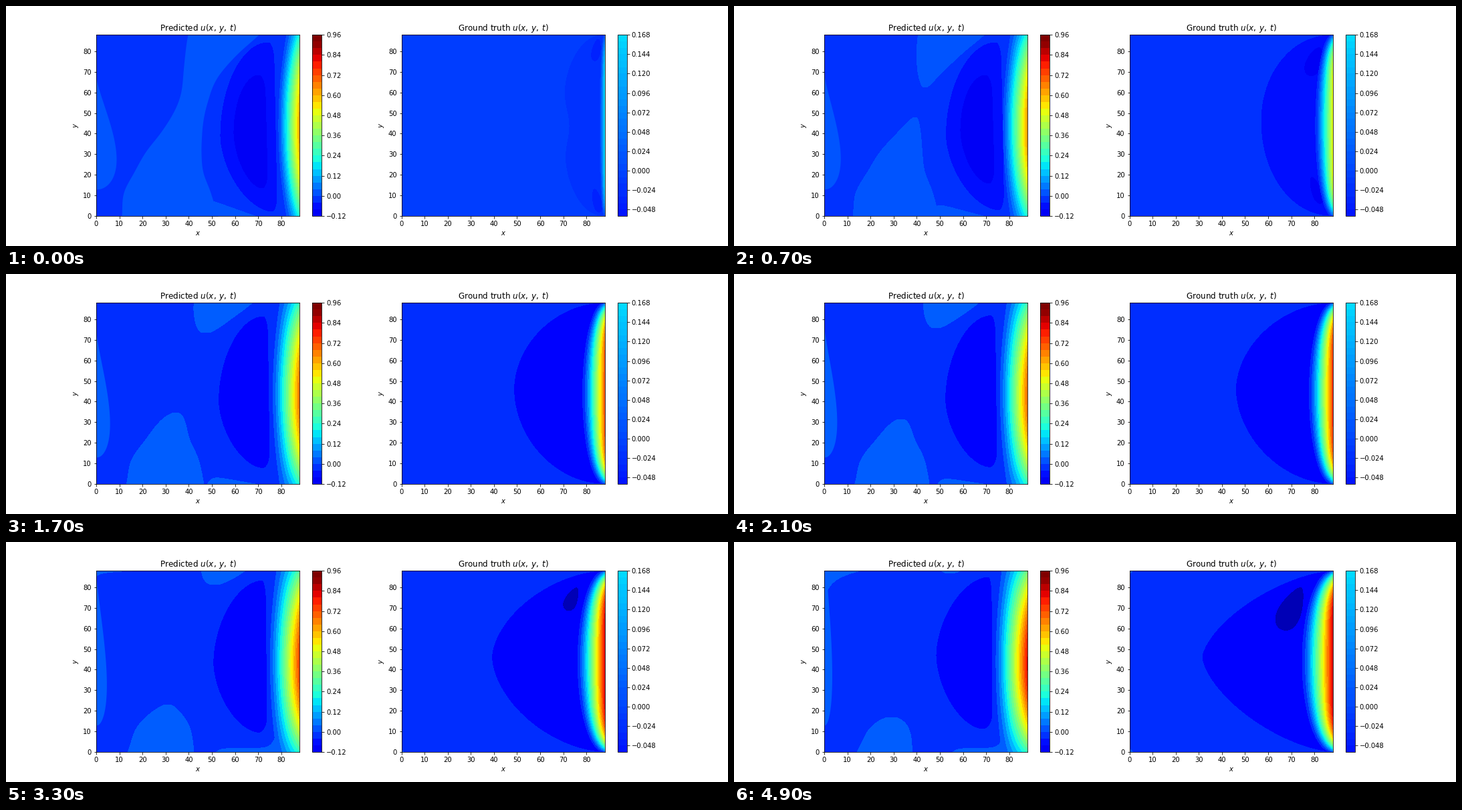
Animation of 1080x360 px, one loop 5000 ms. Source, as a matplotlib script:

```python
import numpy as np
import matplotlib.pyplot as plt
from matplotlib.animation import FuncAnimation

FRAMES = 50
VMIN, VMAX = -0.22, 0.92
TOP, BOTTOM, MIDDLE = 43.2, 315.0, 179.1
HALF = (BOTTOM - TOP) / 2
NICE_STEPS = np.array([0.01, 0.015, 0.02, 0.025, 0.03, 0.04, 0.05])

# Rows, centre line and first half width of the pale strip, in stage pixels.
STRIP_Y = [43, 70, 100, 145, 190, 220, 250, 280, 315]
STRIP_MID = [325, 308, 293, 279, 262, 250, 243, 241, 245]
STRIP_HALF = [53, 40, 28, 22, 31, 42, 52, 65, 72]

plt.rcParams.update({"font.family": "DejaVu Sans", "font.size": 10,
                     "figure.subplot.bottom": 0.125})
fig, (pred, truth) = plt.subplots(1, 2, figsize=(15, 5), dpi=72)
LEFT = {pred: 135.0, truth: 591.5}
jet = plt.get_cmap("jet")
norm = plt.Normalize(VMIN, VMAX)
drawn = []


def setup(ax, title, levels, ticks):
    ax.set(xlim=(0, 88), ylim=(0, 88), xlabel="$x$", ylabel="$y$")
    ax.set_title(title + r" $u(x,\:y,\:t)$")
    ax.set_xticks(range(0, 90, 10))
    ax.set_yticks(range(0, 90, 10))
    sm = plt.cm.ScalarMappable(norm, jet)
    bar = fig.colorbar(sm, ax=ax, boundaries=levels, ticks=ticks)
    bar.minorticks_off()


setup(pred, "Predicted", np.linspace(-0.12, 0.96, 28), np.arange(-1, 9) * 0.12)
setup(truth, "Ground truth", np.linspace(-0.056, 0.168, 29), np.arange(-2, 8) * 0.024)


def shade(u):
    return jet(norm(u))


def level_step(peak):
    """Smallest round step that needs at most 18 levels."""
    i = np.searchsorted(NICE_STEPS, (peak + 0.06) / 18)
    return NICE_STEPS[min(i, len(NICE_STEPS) - 1)]


def curve(x, xp, fp):
    """Smooth cubic through the given points."""
    xp, fp = np.asarray(xp, float), np.asarray(fp, float)
    m = np.gradient(fp, xp)
    i = np.clip(np.searchsorted(xp, x) - 1, 0, len(xp) - 2)
    h = xp[i + 1] - xp[i]
    u = (x - xp[i]) / h
    return ((2 * u**3 - 3 * u**2 + 1) * fp[i] + (u**3 - 2 * u**2 + u) * h * m[i]
            + (3 * u**2 - 2 * u**3) * fp[i + 1] + (u**3 - u**2) * h * m[i + 1])


def to_data(ax, x, y):
    return ((np.asarray(x) - LEFT[ax]) * 88 / 304.4,
            (BOTTOM - np.asarray(y)) * 88 / (BOTTOM - TOP))


def fill(ax, x, y, color):
    drawn.extend(ax.fill(*to_data(ax, x, y), color=color, lw=0, antialiased=False))


def between_x(ax, y, x1, x2, color, where=None):
    left, yd = to_data(ax, x1, y)
    right, _ = to_data(ax, x2, y)
    drawn.append(ax.fill_betweenx(yd, left, right, where=where, color=color,
                                  lw=0, antialiased=False))


def bands(ax, x, y, start, edge, base, power, step):
    """Boundary layer that climbs from base at start to edge at the right side."""
    s = (x - start) / (LEFT[ax] + 304.4 - start)
    u = base + (edge - base) * np.sign(s) * abs(s) ** power
    levels = base + step * np.arange(np.ceil(1.1 / step))
    drawn.append(ax.contourf(*to_data(ax, x, y), u, levels=levels, cmap=jet,
                             vmin=VMIN, vmax=VMAX))


def arc(p, q, n):
    """Quarter superellipse leaving p vertically and reaching q flat."""
    a = np.linspace(0, np.pi / 2, 40)
    c, s = np.cos(a).clip(0) ** (2 / n), np.sin(a) ** (2 / n)
    return np.c_[q[0] + (p[0] - q[0]) * c, p[1] + (q[1] - p[1]) * s]


def pocket(ax, left, top, upper, lower, bottom, n, color):
    ring = np.vstack([arc(left, top, n), arc(upper, top, 2)[::-1],
                      arc(lower, bottom, 2), arc(left, bottom, 1.7)[::-1]])
    fill(ax, *ring.T, color)


def drop(ax, top, bottom, width, skew, color):
    """Teardrop between two tips, fuller near the bottom one."""
    a = np.linspace(0, 2 * np.pi, 60)
    (x1, y1), (x2, y2) = top, bottom
    dx, dy = (x1 - x2) / 2, (y1 - y2) / 2
    side = width * np.sin(a) * (1 - skew * np.cos(a)) / np.hypot(dx, dy)
    fill(ax, (x1 + x2) / 2 + dx * np.cos(a) - dy * side,
         (y1 + y2) / 2 + dy * np.cos(a) + dx * side, color)


def strip(t, color):
    y = np.linspace(43, 315, 273)
    f = (y - 43) / 272
    mid = curve(y, STRIP_Y, STRIP_MID) - 20 * t * f**6
    w2 = curve(y, STRIP_Y, np.square(STRIP_HALF))
    w2 = w2 - (2600 + 900 * f) * t ** (1 - 0.4 * f)
    w = np.sqrt(w2.clip(0))
    between_x(pred, y, mid - w, mid + w, color, where=w2 > 0)


def lens(t, color):
    top = 107 - 110 * t**1.6
    y = np.linspace(max(top, TOP), 275, 200)
    u = (275 - y) / (275 - top)
    width = (30 - 18.5 * t**0.6) * u**0.5 * (1 - u).clip(0) ** 1.35 / 0.34
    between_x(pred, y, 135, 135 + width, color)


def shelf(t, color):
    start = 288 + 40 * t
    x = np.linspace(start, 405, 115)
    rise = 1 - np.exp((start - x) / 6)
    bump = 30 * np.exp(-2.5 * t) * rise * (372 - x) / (372 - start)
    late = np.clip((t - 0.45) / 0.2, 0, 1)
    h = np.maximum(bump, late * (5.5 * rise + 24 * np.exp((x - 405) / 6))).clip(0)
    fill(pred, np.r_[x, 405, start], np.r_[BOTTOM - h, BOTTOM, BOTTOM], color)


def corner(t, color):
    dx = np.linspace(0, 54, 80)
    h = 13 * np.clip((t - 0.62) / 0.3, 0, 1) * np.log(55 / (dx + 1))
    fill(pred, np.r_[135 + dx, 135], np.r_[TOP + h, TOP], color)


def draw_pred(t):
    peak = 0.62 + 0.19 * t
    step = level_step(peak)
    coarse = step > 0.04
    pred.set_facecolor(shade(-step / 2))
    for part in (strip, lens, shelf, corner):
        part(t, shade(step / 2))

    top = 55 + (15 - 17 * t) * coarse
    bottom = 308 - 16 * t - 12 * coarse
    pocket(pred, (321 - 24 * t + 6 * coarse, 195 - 25 * t**1.5),
           (392 - 7 * t - 5 * coarse, top),
           (401 - 10 * t - 6 * coarse, top + 30),
           (405 - 12 * t - 7 * coarse, bottom - 24),
           (398 - 18 * t - 8 * coarse, bottom),
           1.95 - 0.22 * t, shade(-1.5 * step))
    if not coarse:
        dx, dy = -14 * t, -50 * t
        pocket(pred, (341 + dx, 190 + dy / 2), (378 + dx, 104), (388 + dx, 135),
               (391 + dx, 250 + dy), (383 + dx, 273 + dy), 1.95, shade(-2.5 * step))

    x, y = np.meshgrid(np.linspace(385, 440, 90), np.linspace(43, 315.2, 110))
    bend = ((y - MIDDLE) / HALF) ** 2
    start = 408 - 16 * t**0.6 + (12 - 3 * t**0.6) * bend
    side = np.where(y < 183, 0.24 + 0.12 * t, 0.20 + 0.02 * t)
    edge = peak - (peak - side) * ((y - 183) / HALF) ** 2
    bands(pred, x, y, start, edge, 0, 1.18, step)


def draw_truth(t):
    peak = 0.17 + 0.67 * (1 - np.exp(-4.5 * t)) / (1 - np.exp(-4.5))
    step = level_step(peak)
    truth.set_facecolor(shade(-step / 2))

    tip = (831 - 130 * t**0.58, 173)
    n = 2.1 - 0.58 * t
    x, y = np.vstack([arc(tip, (893, 44), n)[::-1], arc(tip, (893, 314), n)]).T
    x = x + 12 * np.exp(-33 * t - ((y - MIDDLE) / 38) ** 2)
    fill(truth, np.r_[893, x], np.r_[44, y], shade(-1.5 * step))

    if step <= 0.04:
        s = 7 * t
        dark = shade(-2.5 * step)
        drop(truth, (886 - 10 * s, 50 + 13 * s), (880 - 20 * s, 82 + 22 * s),
             6 + 5 * s, 0.25, dark)
        drop(truth, (880 - 16 * s, 275 - 18 * s), (888 - 10 * s, 309 - 13 * s),
             6 + s, 0.25, dark)
    q = (t - 0.45) / 0.55
    if q > 0:
        drop(truth, (858 - 10 * q, 69), (852 - 33 * q, 82 + 49 * q),
             16 * q**0.7, 0.4, shade(-0.165))

    r = max(6 * t - 1, 0)
    for y0, dy in ((TOP, r), (BOTTOM, -r)):
        fill(truth, [591.5, 591.5 + r, 591.5], [y0, y0, y0 + dy], shade(step / 2))

    start = 888 - 38 * t**0.38
    x, y = np.meshgrid(np.linspace(start - 2, 896, 90), np.linspace(TOP, BOTTOM, 160))
    v = ((y - MIDDLE) / HALF).clip(-1, 1)
    start = start + (895 - start) * (1 - np.sqrt(1 - v**2))
    bands(truth, x, y, start, peak * (1 - v**6), -step, 1.25, step)


def draw(k):
    while drawn:
        drawn.pop().remove()
    t = k / (FRAMES - 1)
    draw_pred(t)
    draw_truth(t)
    return []


anim = FuncAnimation(fig, draw, frames=FRAMES, init_func=lambda: [],
                     interval=100, repeat=True, repeat_delay=0)
plt.show()
```
